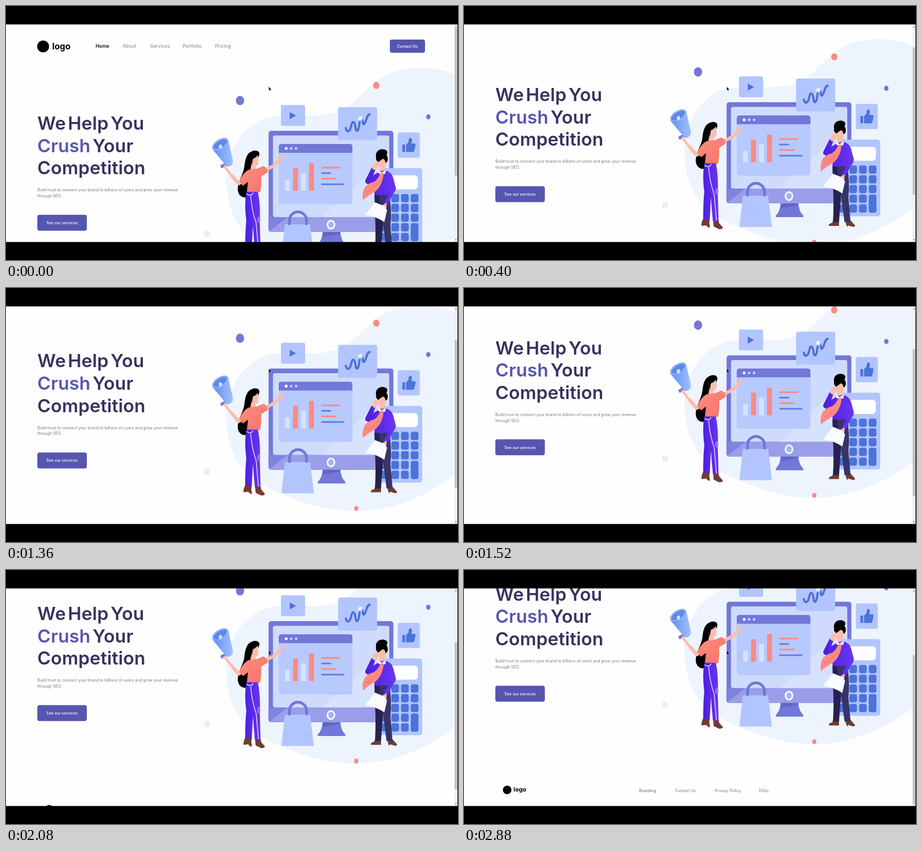
Recreate the animation shown at these times as an HTML page. Size 822x462 px, loop 3.04 s.

```html
<!DOCTYPE html>
<html lang="en">
<head>
<meta charset="utf-8">
<title>Landing page scroll</title>
<style>
html, body { margin: 0; width: 100%; height: 100%; overflow: hidden; background: #000; }
svg { display: block; width: 100vw; height: 100vh; font-family: Inter, "Open Sans", sans-serif; }

#view { animation: scroll 3040ms step-end infinite; }
#page { transform: translateY(calc(var(--y) * -1px)); }
#thumb { transform: translateY(calc(var(--y) * .68px)); }
@keyframes scroll {
  0% { --y: 0; }
  7.89% { --y: 7; }
  10.52% { --y: 34; }
  13.15% { --y: 52; }
  26.31% { --y: 53; }
  28.94% { --y: 54.4; }
  42.1% { --y: 62; }
  44.73% { --y: 80.6; }
  47.36% { --y: 98; }
  49.99% { --y: 104.5; }
  60.52% { --y: 105.5; }
  63.15% { --y: 109.5; }
  65.78% { --y: 117.3; }
  68.42% { --y: 134; }
  71.05% { --y: 151; }
  73.68% { --y: 163; }
  76.31%, 100% { --y: 169.3; }
}

.title { font-size: 33px; font-weight: 600; letter-spacing: .004em; word-spacing: -.14em; fill: #38325f; }
.nav { font-size: 8.8px; fill: #85858b; }
.small { font-size: 7.2px; fill: #77777d; }
.label { font-size: 7.1px; font-weight: 500; fill: #fff; }
.brand { font-weight: 700; fill: #000; }
.button, .crush { fill: #5656b1; }
.card { fill: #b2c5fe; }
.violet { fill: #7277d9; }
.blue { fill: #4c73d9; }
.coral { fill: #fc8a82; }
.skin { fill: #fdbda9; }
.boot { fill: #743b2e; }
.line { fill: none; stroke-linecap: round; stroke-linejoin: round; }
</style>
</head>
<body>
<svg viewBox="0 0 822 462">
<defs>
  <linearGradient id="purple" x1="0" x2="1"><stop stop-color="#4a1fe0"/><stop offset="1" stop-color="#6a35f2"/></linearGradient>
  <linearGradient id="shirt" x1="0" x2="1" y2="1"><stop stop-color="#fd8f80"/><stop offset="1" stop-color="#f77169"/></linearGradient>
  <linearGradient id="horn" x1="0" x2="1"><stop stop-color="#5f8eee"/><stop offset="1" stop-color="#a3c0ff"/></linearGradient>
  <radialGradient id="glow"><stop offset=".3" stop-color="#fff" stop-opacity=".9"/><stop offset="1" stop-color="#fff" stop-opacity="0"/></radialGradient>
</defs>

<g id="view">
<rect y="33" width="821" height="397" fill="#fefefe"/>
<g id="page">
  <path fill="#edf4fd" d="M816 125C780 108 725 108 690 126C650 148 640 179 600 193C560 206 530 196 490 200C440 206 400 255 401 320C403 395 440 428 490 450C550 478 600 487 640 486C715 485 780 449 816 420Z"/>

  <!-- header -->
  <circle cx="67.5" cy="73.5" r="10.8"/>
  <text class="brand" x="84" y="78.5" font-size="15.7">logo</text>
  <g class="nav">
    <text x="163" y="76" font-weight="600" fill="#111">Home</text>
    <text x="212" y="76">About</text>
    <text x="262" y="76">Services</text>
    <text x="321" y="76">Portfolio</text>
    <text x="380" y="76">Pricing</text>
  </g>
  <rect class="button" x="698" y="61" width="64" height="24" rx="4"/>
  <text class="label" x="730" y="75.7" text-anchor="middle">Contact Us</text>

  <!-- hero copy -->
  <g class="title">
    <text x="57" y="225">We Help You</text>
    <text x="57" y="265.6"><tspan class="crush">Crush</tspan> Your</text>
    <text x="57" y="306.2">Competition</text>
  </g>
  <g class="small">
    <text x="57" y="337.3">Build trust to connect your brand to billions of users and grow your revenue</text>
    <text x="57" y="348">through SEO.</text>
  </g>
  <rect class="button" x="57" y="379.8" width="90" height="29" rx="4"/>
  <text class="label" x="102" y="397" text-anchor="middle">See our services</text>

  <!-- dots -->
  <ellipse class="violet" cx="425.6" cy="172" rx="7.5" ry="8.4"/>
  <ellipse class="violet" cx="768" cy="201.7" rx="4" ry="4.6"/>
  <ellipse class="coral" cx="673.3" cy="144.5" rx="5.6" ry="6.4"/>
  <ellipse class="coral" cx="637" cy="481.5" rx="3.9" ry="4.5"/>
  <ellipse cx="365.6" cy="414.5" rx="5.5" ry="6.3" fill="#e7eefc"/>

  <!-- monitor -->
  <path class="violet" d="M576 410H608Q609 426 617 433V436H567V433Q575 426 576 410Z"/>
  <path fill="#6266c6" d="M576 410H608V414L576 420Z"/>
  <rect class="violet" x="477.5" y="227" width="227" height="184" rx="5"/>
  <path fill="#9a9de8" d="M477.5 384H704.5V406Q704.5 411 699.5 411H482.5Q477.5 411 477.5 406Z"/>
  <path fill="#7f83de" d="M477.5 384H512L479 410Q477.5 409 477.5 406Z"/>
  <rect x="485.5" y="235.5" width="211.5" height="148.5" rx="4" fill="#cfdbfd"/>
  <path fill="#d7e2fe" d="M697 270V380Q697 384 693 384H575Z"/>
  <ellipse cx="591" cy="397.8" rx="6.4" ry="7.4" fill="#a3b4f6" stroke="#fff" stroke-width="2.8"/>

  <!-- window with chart -->
  <rect x="496" y="251" width="134" height="109.5" rx="5" fill="#b8c9fd"/>
  <path class="violet" d="M496 267V256Q496 251 501 251H625Q630 251 630 256V267Z"/>
  <circle cx="509.5" cy="259" r="2.6" fill="#fff"/>
  <g fill="#c3cdf8"><circle cx="518.5" cy="259" r="2.5"/><circle cx="527.6" cy="259" r="2.5"/></g>
  <g fill="#d7e1fc"><rect x="507.5" y="316" width="8.5" height="20"/><rect x="536.5" y="304" width="9" height="32"/></g>
  <g class="coral"><rect x="522" y="295" width="9" height="41"/><rect x="551" y="286" width="9" height="50"/></g>
  <g class="line" stroke-width="3">
    <path stroke="#fc8a82" d="M574.5 294H606.5M574.5 314H600"/>
    <path stroke="#5b81e2" d="M574.5 304H590M574.5 324.3H614"/>
  </g>

  <!-- floating cards -->
  <g class="card">
    <rect x="500" y="180" width="44" height="38" rx="3.5"/>
    <rect x="604" y="184" width="71" height="60" rx="3.5"/>
    <rect x="712.5" y="230" width="40" height="46" rx="3.5"/>
  </g>
  <path class="blue" d="M516 193L527.5 199.3L516 205.7Z"/>
  <path class="line" stroke="#4c6fd6" stroke-width="3.8" d="M618 222Q620 231 625 226C629 219 628 210 632 211C637 213 634 228 639 227C644 222 641 208 646 206C651 204 647 216 651 215C656 211 655 198 661.5 197"/>
  <circle cx="644.5" cy="205" r="6" fill="url(#glow)"/>
  <g class="blue">
    <rect x="720.8" y="252" width="5" height="13.5" rx="1"/>
    <path d="M727.5 252.5L732 247.5Q732 240 735 240Q739 240 738 246L737 250H743Q745.5 251 744.5 254L742.5 263.5Q742 265.5 739.5 265.5H727.5Z"/>
  </g>

  <!-- shopping bag -->
  <path class="card" d="M507 397H553L560 454H501Z"/>
  <path class="line" stroke="#7078d8" stroke-width="5" d="M515.5 396V390A15.5 15.5 0 0 1 546.5 390V396"/>

  <!-- calculator -->
  <rect class="card" x="680" y="295" width="77" height="139.5" rx="5"/>
  <rect x="692" y="308" width="57" height="25.5" rx="6" fill="#fff"/>
  <g id="keys" class="blue"></g>

  <!-- woman -->
  <g>
    <path d="M446 265C453 261 464 263 460 273L448 300L440 347C430 351 421 344 421.5 332C422 317 432 306 433.5 292C435 278 438 268 446 265Z"/>
    <path class="skin" d="M448 275Q454 276 458 271L459.5 283Q459 291 454 291L455 299H444L446 289Q445 281 448 275Z"/>
    <path d="M445 280C445 270 451 265 460 267Q456 276 449 278L447 290Z"/>
    <path class="line" stroke="#fdbda9" stroke-width="6" d="M470 298Q483 294 491 287L501 277"/>
    <path class="line" stroke="#fdbda9" stroke-width="2.6" d="M499 279L505.5 272M500 277L502 272"/>
    <path class="violet" d="M389.5 290L400 284.5L402.5 289.5L392 295.5Z"/>
    <path class="line" stroke="#fdbda9" stroke-width="6.5" d="M433 317L423 323L411 309"/>
    <path class="line" stroke="#fdbda9" stroke-width="4.5" d="M412 311L397.5 292"/>
    <path fill="url(#horn)" d="M375 260L398 288Q401 294 407 291Q414 288 412.500 280L404 243Z"/>
    <ellipse cx="389.5" cy="251" rx="16.3" ry="8.5" fill="#8fb0f8" transform="rotate(-32 389.5 251)"/>
    <ellipse cx="389.5" cy="251.5" rx="13.5" ry="6.3" fill="#5b88ea" transform="rotate(-32 389.5 251.5)"/>
    <ellipse cx="390" cy="256" rx="3" ry="4" fill="#d3e0ff"/>
    <path fill="url(#shirt)" d="M441 298L456 296L468 291Q475 294 476.5 302L464 310Q465 325 462 339H438L440 320L431 327L424 319Q431 303 441 298Z"/>
    <path class="boot" d="M436 437L447 439L446 447Q448 453 446 456L440 451L432 452Q431 446 436 437ZM453 441H463L464 447L471 455Q470 458 464 458L454 453Z"/>
    <path fill="url(#purple)" d="M437 338H458Q463 360 461.5 395L463 443H452.500L449 400L447 440H435Q435 410 437 390Q433 362 437 338Z"/>
    <path class="line" stroke="#e3d9ff" stroke-width="1.5" d="M438 342Q447 347 449 340M445 346Q447 372 455 395L459 441"/>
    <ellipse cx="459.5" cy="389" rx="3" ry="6" fill="#8f70f2"/>
  </g>

  <!-- man -->
  <g>
    <path class="boot" d="M671 442H682V452H664Q661 449 670 446ZM693 442H703L711 451Q711 455 705 453L698 451V453H696Z"/>
    <path fill="#28214f" d="M670 343H690L686 390L682 445H671Q673 410 671 380Z"/>
    <path fill="#37346a" d="M678 343H697Q702 375 699 400L703 445H692L685 390Z"/>
    <path class="skin" d="M676 277L691 277L690 293Q689 297 686 297L688 304H678L679 295Q675 289 676 277Z"/>
    <path d="M673 275C671 264 680 259 688 261C695 263 694 267 692 271C697 278 693 286 690 285Q690 279 685 278L677 284Q672 281 673 275Z"/>
    <path fill="url(#purple)" d="M679 301L690 299Q701 302 704 312L709 331Q709 337 703 343L694 362L687 358L695 344H670L671 326L658 324Q651 321 654 316L665 294L672 297L668 308Z"/>
    <path class="skin" d="M666 296L668 287Q673 281 677 286L676 294L672 299Z"/>
    <path fill="#fff" d="M677 299L683 303L691 298L690 305L683 307L677 304Z"/>
    <path class="coral" d="M681 304L687 304Q685 326 672 337Q661 343 649 353Q647 339 653 329Q661 321 669 320Q677 315 681 304Z"/>
    <path fill="none" stroke="#ea6d68" d="M655 339Q667 334 675 323"/>
    <path class="skin" d="M685 362L692 358L692 367L686 372Z"/>
    <path fill="#fafbff" d="M671 357L688 364L693 371L688 393Q672 382 653 380Z"/>
  </g>

  <!-- footer -->
  <circle cx="78.5" cy="569.3" r="7.8"/>
  <text class="brand" x="90" y="572.5" font-size="10.9">logo</text>
  <g class="small">
    <text x="318.5" y="573.5" font-weight="500">Branding</text>
    <text x="384" y="573.5">Contact Us</text>
    <text x="456" y="573.5">Privacy Policy</text>
    <text x="536.5" y="573.5">FAQs</text>
  </g>
</g>

<!-- scrollbar -->
<rect x="815.5" y="33" width="5.5" height="397" fill="#f1f1f1"/>
<rect id="thumb" x="816" y="40" width="4.6" height="268" fill="#c1c1c1"/>
<path fill="#505050" d="M816.7 38.8L818.3 36.8L819.9 38.8ZM816.7 424.5L818.3 426.5L819.9 424.5Z"/>
</g>

<path d="M0 0H822V33.4H0ZM0 429.300H822V462H0ZM821 0H822V462H821Z"/>
<path d="M478 147V153.5L479.5 152.3L480.5 154.5L481.4 154L480.5 152H482.3Z" stroke="#fff" stroke-width=".5" paint-order="stroke"/>
</svg>

<script>
const keys = document.getElementById("keys");

function addKey(column, row, height = 15) {
  const key = document.createElementNS(keys.namespaceURI, "rect");
  const box = { x: 683 + column * 17.7, y: 342 + row * 17.7, width: 14, height, rx: 4 };
  for (const name in box) key.setAttribute(name, box[name]);
  keys.append(key);
}

for (let row = 0; row < 5; row++) {
  for (let column = 0; column < 4; column++) {
    if (column < 3 || row < 3) addKey(column, row);
  }
}
addKey(3, 3, 33);
</script>
</body>
</html>
```
